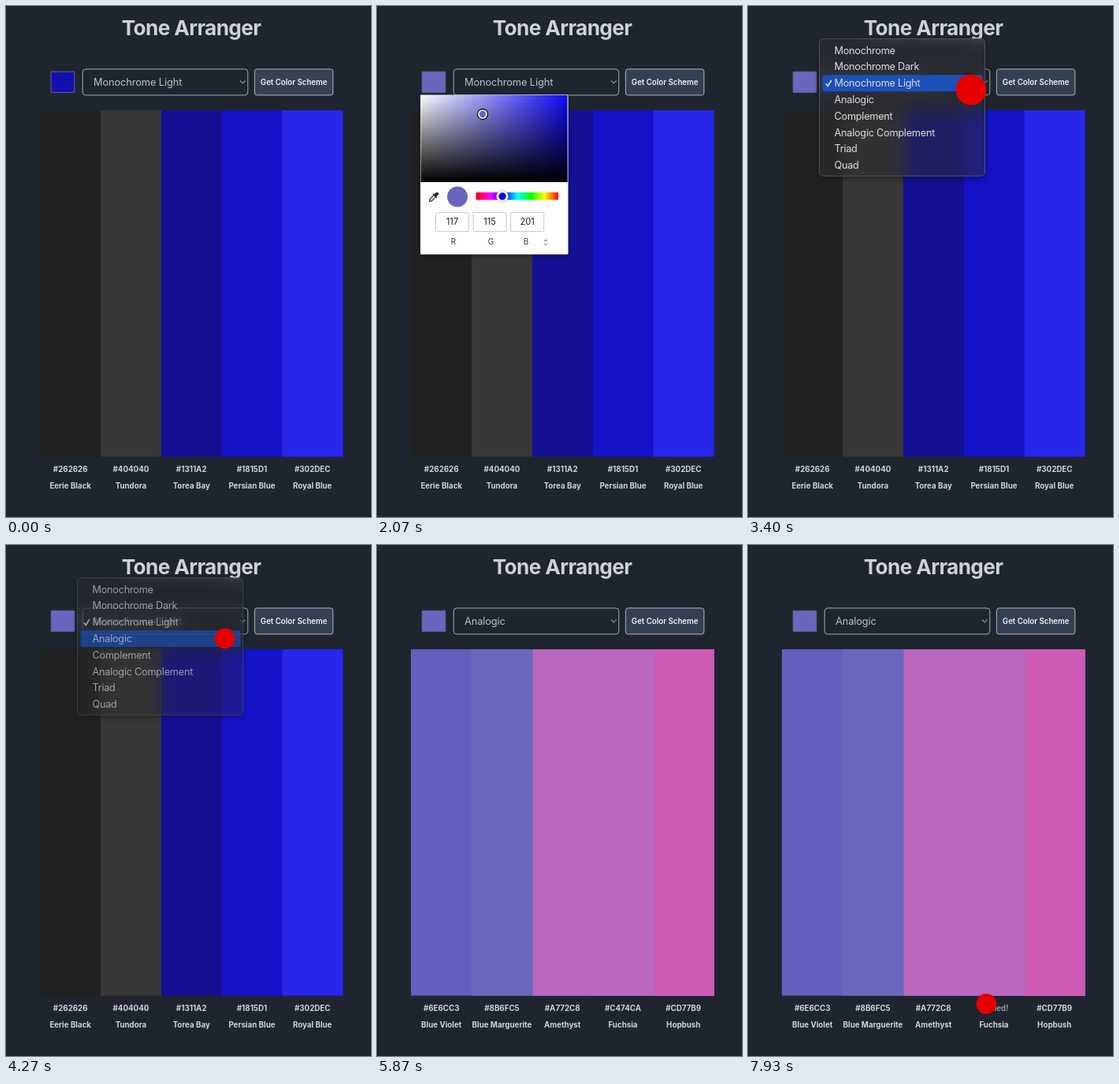
An HTML page with a canvas for the animation above (8 s loop, 463x647 px).

```html
<!DOCTYPE html>
<html lang="en">
<head>
<meta charset="utf-8">
<title>Tone Arranger</title>
<style>
  html, body { margin: 0; width: 100%; height: 100%; overflow: hidden; background: #1e252f; }
  canvas { display: block; width: 463px; height: 647px; }
</style>
</head>
<body>
<canvas id="stage"></canvas>
<script>
const W = 463, H = 647, LOOP = 8000, FPS = 15;
const canvas = document.getElementById('stage');
const ctx = canvas.getContext('2d');
const dpr = window.devicePixelRatio || 1;
canvas.width = W * dpr;
canvas.height = H * dpr;

const BG = '#1e252f';
const MODES = ['Monochrome', 'Monochrome Dark', 'Monochrome Light', 'Analogic',
  'Complement', 'Analogic Complement', 'Triad', 'Quad'];

const BARS_RIGHT = 427.4;
const BLUES = {
  lefts: [43.4, 120, 197, 274, 350.5],
  colors: [[34, 34, 34], [55, 55, 55], [20, 17, 149], [21, 18, 200], [41, 38, 234]],
  hex: ['#262626', '#404040', '#1311A2', '#1815D1', '#302DEC'],
  names: ['Eerie Black', 'Tundora', 'Torea Bay', 'Persian Blue', 'Royal Blue']
};
const PINKS = {
  lefts: [43, 119.5, 197.5, 272, 352],
  colors: [[97, 96, 188], [107, 103, 191], [185, 104, 192], [185, 103, 191], [205, 91, 181]],
  hex: ['#6E6CC3', '#8B6FC5', '#A772C8', '#C474CA', '#CD77B9'],
  names: ['Blue Violet', 'Blue Marguerite', 'Amethyst', 'Fuchsia', 'Hopbush']
};

// Each press lasts from one tick to another; the pointer may travel meanwhile.
const PRESSES = [
  { down: 10, up: 15, from: [71, 99] },
  { down: 17, up: 31, from: [223, 142], to: [134, 137], move: [18, 28] },
  { down: 40, up: 45, from: [283, 106] },
  { down: 49, up: 66, from: [283, 106], to: [277.5, 118.3], move: [51, 63] },
  { down: 77, up: 82, from: [346.5, 102.3] },
  { down: 116, up: 121, from: [302.3, 581] }
];
const [, PICK, , CHOOSE] = PRESSES;

const clamp = (v, lo = 0, hi = 1) => Math.min(hi, Math.max(lo, v));
const lerp = (a, b, p) => a + (b - a) * p;
const span = (t, a, b) => clamp((t - a) / (b - a));
const smooth = p => p * p * (3 - 2 * p);
const mix = (a, b, p) => a.map((v, i) => lerp(v, b[i], p));
const rgb = c => `rgb(${c.map(Math.round).join(',')})`;

function pointer(press, tick) {
  if (!press.to) return press.from;
  return mix(press.from, press.to, smooth(span(tick, ...press.move)));
}

function box(x, y, w, h, radius, fill, stroke) {
  ctx.beginPath();
  ctx.roundRect(x, y, w, h, radius);
  if (fill) { ctx.fillStyle = fill; ctx.fill(); }
  if (stroke) { ctx.strokeStyle = stroke; ctx.lineWidth = 1; ctx.stroke(); }
}

function shadow(blur, offset, alpha) {
  ctx.shadowColor = `rgba(0,0,0,${alpha})`;
  ctx.shadowBlur = blur * dpr;
  ctx.shadowOffsetY = offset * dpr;
}

function disc(x, y, r, fill, stroke, width = 1) {
  ctx.beginPath();
  ctx.arc(x, y, r, 0, Math.PI * 2);
  if (fill) { ctx.fillStyle = fill; ctx.fill(); }
  if (stroke) { ctx.strokeStyle = stroke; ctx.lineWidth = width; ctx.stroke(); }
}

function line(points, color, width) {
  ctx.beginPath();
  points.forEach(([x, y], i) => i ? ctx.lineTo(x, y) : ctx.moveTo(x, y));
  ctx.strokeStyle = color;
  ctx.lineWidth = width;
  ctx.stroke();
}

function text(str, x, y, { size, weight = 400, color, align = 'center', spacing = 0 }) {
  ctx.font = `${weight} ${size}px Inter, sans-serif`;
  ctx.letterSpacing = spacing + 'px';
  ctx.textAlign = align;
  ctx.textBaseline = 'alphabetic';
  ctx.fillStyle = color;
  ctx.fillText(str, x, y);
}

function linear(x0, y0, x1, y1, stops) {
  const g = ctx.createLinearGradient(x0, y0, x1, y1);
  stops.forEach((c, i) => g.addColorStop(i / (stops.length - 1), c));
  return g;
}

function drawHeader(tick, swatch) {
  text('Tone Arranger', 235, 36.8, { size: 26.2, weight: 700, color: '#d0d0d7', spacing: -0.62 });
  box(57.2, 83.2, 29.6, 26.2, 0, rgb(swatch), '#62658c');
  box(97.2, 79.9, 209.6, 33, 4, null, '#a6aaaf');
  text(tick < 65 ? 'Monochrome Light' : 'Analogic', 111, 101,
    { size: 12.8, color: '#bfc2c6', align: 'left', spacing: -0.1 });
  line([[297, 94.5], [300.3, 98], [303.6, 94.5]], '#8d9298', 1.1);
  box(315.4, 79.9, 99.4, 33, 3, tick < 1 ? '#374151' : '#324052', '#b2b6ba');
  text('Get Color Scheme', 365.2, 99.6, { size: 9.7, weight: 600, color: '#f2f3f5' });
}

function drawBars({ lefts, colors }) {
  // Every bar reaches the right end, so the next one covers it without a seam.
  colors.forEach((color, i) => {
    ctx.fillStyle = rgb(color);
    ctx.fillRect(lefts[i], 132, BARS_RIGHT - lefts[i], 438.6);
  });
}

function drawPalette(tick) {
  drawBars(BLUES);
  const reveal = span(tick, 82, 87);
  if (reveal) {
    ctx.globalAlpha = reveal;
    drawBars({ ...PINKS, colors: PINKS.colors.map((c, i) => mix(BLUES.colors[i], c, reveal)) });
    ctx.globalAlpha = 1;
  }

  const { hex, names } = tick < 84 ? BLUES : PINKS;
  const style = { size: 9.75, weight: 700, color: '#d2d3d8' };
  hex.forEach((code, i) => {
    const x = 81.7 + i * 76.75;
    const hover = i === 3 ? span(tick, 107, 109) : 0;
    const color = rgb(mix([210, 211, 216], [145, 148, 153], hover));
    const label = i === 3 && tick >= 118 ? 'Copied!' : code;
    text(label, x, 589.6, { ...style, color });
    text(names[i], x, 610.8, style);
  });
}

function drawDropper() {
  ctx.save();
  ctx.translate(71.8, 242);
  ctx.rotate(Math.PI / 4);
  box(-1.9, -8, 3.8, 5.5, 1.8, '#222');
  box(-3.6, -3.2, 7.2, 1.7, 0.6, '#222');
  line([[-1.6, -1.5], [-1.6, 5.2], [0, 7.2], [1.6, 5.2], [1.6, -1.5]], '#222', 1.2);
  ctx.restore();
}

function drawPicker(tick, swatch) {
  const [x, y] = pointer(PICK, tick);
  const sat = (x - 55) / 187 + 0.006;
  const val = 1 - (y - 113) / 110 + 0.0064;
  const blue = 255 * val;
  const values = [blue * (1 - sat * 0.977), blue * (1 - sat), blue].map(Math.round);

  ctx.save();
  shadow(6, 2, 0.4);
  box(55, 112.5, 187.5, 202, 1, '#fff');
  ctx.restore();

  ctx.fillStyle = linear(55, 0, 242, 0, ['#fff', '#0d08f5']);
  ctx.fillRect(55.5, 113, 186, 110);
  ctx.fillStyle = linear(0, 113, 0, 223, ['rgba(0,0,0,0)', '#000']);
  ctx.fillRect(55.5, 113, 186, 110);
  disc(x, y, 5.6, rgb(swatch), '#111', 3.2);
  disc(x, y, 5, null, '#fff', 1.7);

  drawDropper();
  disc(102, 241.5, 13, rgb(swatch));
  box(125.5, 236, 104.5, 9.5, 1,
    linear(126, 0, 230, 0, ['#f00', '#f0f', '#00f', '#0ff', '#0f0', '#ff0', '#f00']));
  disc(159, 241, 6.2, '#0a06f2', '#b9b9c6', 3);
  disc(159, 241, 6, null, '#fff', 2);

  values.forEach((value, i) => {
    const left = 74.5 + i * 47.6;
    box(left, 261.5, 42, 24, 1, '#fff', '#c9c9cf');
    text(value, left + 21, 277, { size: 11.2, color: '#222' });
    text('RGB'[i], left + 22.3 - (i === 2 ? 3 : 0), 302.4, { size: 9.8, color: '#333' });
  });
  line([[212, 297.8], [214, 295.8], [216, 297.8]], '#444', 1);
  line([[212, 300.6], [214, 302.6], [216, 300.6]], '#444', 1);
}

function drawMenu(tick) {
  const fade = (1 - span(tick, 62, 72)) ** 2;
  const active = pointer(CHOOSE, tick)[1] > 108.5 ? 3 : 2;
  const frame = [90.5, 41.5, 210, 173.7, 5];

  ctx.save();
  ctx.globalAlpha = fade;

  ctx.save();
  ctx.beginPath();
  ctx.roundRect(...frame);
  ctx.clip();
  ctx.filter = `blur(${10 * dpr}px)`;
  ctx.drawImage(canvas, 0, 0, W, H);
  ctx.filter = 'none';
  ctx.fillStyle = 'rgba(44,44,46,.5)';
  ctx.fillRect(90, 41, 211, 175);
  ctx.restore();

  // Shadow only outside the panel, which is translucent.
  ctx.save();
  ctx.beginPath();
  ctx.rect(0, 0, W, H);
  ctx.roundRect(...frame);
  ctx.clip('evenodd');
  shadow(10, 3, 0.4);
  box(...frame, '#000');
  ctx.restore();
  box(...frame, null, '#50545b');

  box(94.5, 87.2 + (active - 2) * 20.8, 203, 21, 4, '#1b50b9');
  MODES.forEach((mode, i) => text(mode, 109.5, 60.6 + i * 20.8,
    { size: 12.7, color: '#dddee0', align: 'left', spacing: -0.24 }));
  line([[98.8, 98.3], [101.3, 101.4], [105.8, 94.2]], '#eee', 1.5);
  ctx.restore();
}

function drawPresses(tick) {
  for (const press of PRESSES) {
    const level = clamp(Math.min(tick - press.down + 1, press.up - tick), 0, 3);
    if (level) disc(...pointer(press, tick), level * 6.45, '#e60000');
  }
}

function render(time) {
  const tick = Math.floor((time % LOOP + 4) * FPS / 1000) % (LOOP * FPS / 1000);
  const picked = smooth(span(tick, ...PICK.move));
  const swatch = mix([19, 16, 176], [106, 102, 191], picked);

  ctx.setTransform(dpr, 0, 0, dpr, 0, 0);
  ctx.fillStyle = BG;
  ctx.fillRect(0, 0, W, H);
  drawHeader(tick, swatch);
  drawPalette(tick);
  if (tick >= 12 && tick < 41) drawPicker(tick, swatch);
  if (tick >= 50 && tick < 72) drawMenu(tick);
  drawPresses(tick);
}

const start = performance.now();
function loop() {
  render(performance.now() - start);
  requestAnimationFrame(loop);
}
loop();
</script>
</body>
</html>
```
